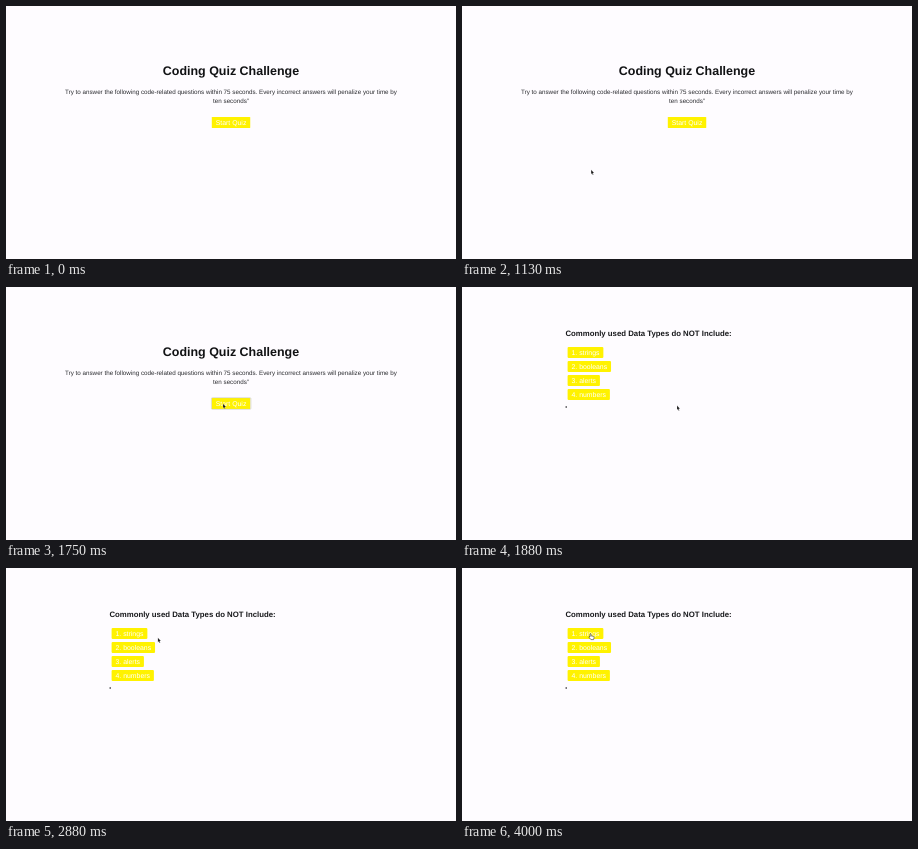
Recreate the animation shown at these times as an HTML page. Size 450x253 px, loop 5.01 s.

```html
<!DOCTYPE html>
<html lang="en">
<head>
<meta charset="utf-8">
<title>Coding Quiz</title>
<style>
  html, body { margin: 0; width: 100%; height: 100%; overflow: hidden; background: #fefcff; }
  svg { display: block; width: 100%; height: 100%; }
  text { font-family: "Liberation Sans", Arial, sans-serif; font-size: 6.26px; fill: #2b2c30; text-rendering: geometricPrecision; }
  .title { font-size: 12.46px; font-weight: bold; fill: #111214; }
  .ask { font-size: 7.8px; font-weight: bold; fill: #17181b; }
  .mid { text-anchor: middle; }
  .btn rect { fill: #fff200; }
  .btn text { font-size: 6.9px; fill: #fff; }
  #focus rect { stroke: #c8c8bc; stroke-width: .6; fill: none; }
</style>
</head>
<body>
<svg viewBox="0 0 450 253">
  <g id="intro">
    <text class="title mid" x="225" y="69.2">Coding Quiz Challenge</text>
    <text class="mid" x="225" y="87.9">Try to answer the following code-related questions within 75 seconds. Every incorrect answers will penalize your time by</text>
    <text class="mid" x="225" y="97.4">ten seconds”</text>
    <g id="start"></g>
    <g id="focus"><rect x="205.4" y="110.7" width="39.5" height="11.6" rx="1"/></g>
  </g>
  <g id="quiz">
    <text class="ask" x="103.4" y="48.8">Commonly used Data Types do NOT Include:</text>
    <g id="options"></g>
    <circle cx="104.2" cy="120" r=".8" fill="#17181b"/>
  </g>
  <g id="cursor">
    <path id="arrow" d="M0 0V4.5L1 3.6L1.7 5.2L2.4 4.9L1.7 3.3H3Z" fill="#111" stroke="#fff" stroke-width=".2"/>
    <path id="hand" d="M0 .5Q.5 -.3 1 .5V2.3L3.6 2.9Q4.2 3.1 4.1 3.8L3.6 6.1H.9L-1.2 3.6Q-1.1 2.8 0 3.5Z" fill="#fff" stroke="#333" stroke-width=".6"/>
  </g>
</svg>
<script>
const LOOP = 5010, BEAT = 125, FOCUS_BEAT = 14, QUIZ_BEAT = 15;
const $ = id => document.getElementById(id);

// A button is as wide as its label plus padding.
function addButton(parent, label, x, y, radius) {
  const pad = 3.9;
  parent.insertAdjacentHTML("beforeend",
    `<g class="btn"><rect x="${x}" y="${y}" height="11" rx="${radius}"/>` +
    `<text x="${x + pad}" y="${y + 7.9}">${label}</text></g>`);
  const [rect, text] = parent.lastElementChild.children;
  rect.setAttribute("width", text.getComputedTextLength() + 2 * pad);
}

addButton($("start"), "Start Quiz", 205.8, 111, .6);
["strings", "booleans", "alerts", "numbers"].forEach((label, i) =>
  addButton($("options"), `${i + 1}. ${label}`, 105.6, 60 + i * 14, 1.1));

// Stops of the pointer
const stops = [
  { beat: 9, x: 129.1, y: 163.7 },
  { beat: 13, x: 219, y: 114.8 },
  { beat: 15, x: 215, y: 118.5 },
  { beat: 18, x: 209.2, y: 112.3 },
  { beat: 23, x: 151.9, y: 69.8 },
  { beat: 26, x: 128, y: 65.5 }
];

const smooth = p => p * p * (3 - 2 * p);
const mix = (a, b, p) => a + (b - a) * p;

function pointerAt(beat) {
  const next = stops.findIndex(s => s.beat > beat);
  if (next < 0) return stops[stops.length - 1];
  if (next === 0) return null;
  const a = stops[next - 1], b = stops[next];
  const p = smooth((beat - a.beat) / (b.beat - a.beat));
  return { x: mix(a.x, b.x, p), y: mix(a.y, b.y, p) };
}

const show = (id, on) => { $(id).style.display = on ? "" : "none"; };

function draw(t) {
  // Beats fall on whole hundredths of a second.
  const beat = Math.floor(Math.floor(t / 10) * 10 / BEAT);
  show("intro", beat < QUIZ_BEAT);
  show("quiz", beat >= QUIZ_BEAT);
  show("focus", beat >= FOCUS_BEAT);

  const at = pointerAt(beat);
  show("cursor", at);
  if (!at) return;
  const overOption = at.x < 141 && beat >= QUIZ_BEAT;
  $("cursor").setAttribute("transform", `translate(${at.x} ${at.y})`);
  show("hand", overOption);
  show("arrow", !overOption);
}

const begin = performance.now();
function tick() {
  draw((performance.now() - begin) % LOOP);
  requestAnimationFrame(tick);
}
tick();
</script>
</body>
</html>
```
